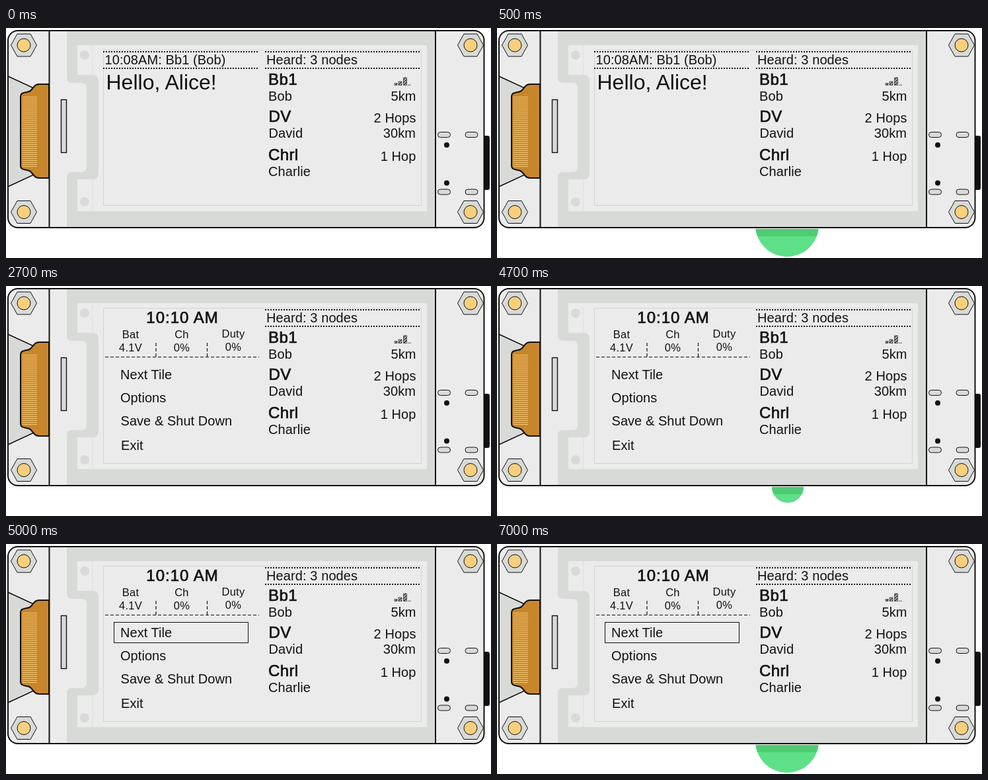
An HTML page for the animation above (8000 ms loop, 734 by 348 pixels).

```html
<!DOCTYPE html>
<html lang="en">
<head>
<meta charset="utf-8">
<title>E-ink device menu</title>
<style>
html, body { margin: 0; width: 100%; height: 100%; overflow: hidden; background: #fff; }
svg { display: block; width: 100%; height: 100%; }
text { font: 20px "Liberation Sans", Arial, sans-serif; letter-spacing: .1px; fill: #111; }
.big { font-size: 32px; letter-spacing: 0; }
.name, .clock { font-size: 24px; letter-spacing: .4px; stroke: #111; stroke-width: .7px; }
.clock { letter-spacing: 1px; }
.small { font-size: 16.5px; letter-spacing: .3px; }
.menu { letter-spacing: .05px; }
.end { text-anchor: end; }
.mid { text-anchor: middle; }
.line { fill: none; stroke: #111; }
.part { fill: #d8dad7; stroke: #111; }
</style>
</head>
<body>
<svg viewBox="0 0 734 348">
  <defs>
    <clipPath id="below"><rect y="304" width="734" height="44"/></clipPath>
    <clipPath id="shade"><rect y="304" width="734" height="11"/></clipPath>
    <pattern id="hatch" width="3" height="3" patternUnits="userSpaceOnUse" patternTransform="rotate(45)">
      <rect width="3" height="3" fill="#ebebeb"/><rect width="1.6" height="3" fill="#222"/>
    </pattern>
    <g id="nut">
      <path class="part" d="M-19.5 0L-10-17H10L19.5 0L10 17H-10Z"/>
      <circle r="10" fill="#f8cf7c" stroke="#111"/>
    </g>
    <rect id="pad" class="part" x="-9.5" y="-4" width="19" height="8" rx="4"/>
    <path id="rules" class="line" stroke-width="2" stroke-dasharray="2 2" d="M0 36H236M0 61H236"/>
  </defs>

  <!-- board -->
  <rect x="718" y="163" width="14" height="82" rx="3" fill="#111"/>
  <rect x="3" y="4" width="720.5" height="298" rx="15" fill="#ebebeb"/>
  <path fill="#d8dad7" d="M92 4H650V302H92V226Q92 218 100 218H115Q122 218 122 211V90Q122 83 115 83H100Q92 83 92 75Z"/>
  <path fill="#ebebeb" d="M108 26H637V277H108V229H131Q140 229 140 220V80Q140 71 131 71H108Z"/>
  <path d="M131 26V71M131 229V277" stroke="#dddfdc" fill="none"/>
  <g fill="#d8dad7"><circle cx="119" cy="41" r="7"/><circle cx="119" cy="263" r="7"/></g>
  <rect x="147.5" y="33.5" width="481" height="235" fill="none" stroke="#d3d5d2"/>

  <!-- ribbon cable -->
  <path class="part" d="M3 73L42 91V222L3 240Z" stroke-width="1.5"/>
  <path d="M65 85H50Q46 85 43 88L38 94Q35 97 31 97L27 98Q22 99 22 104V208Q22 213 27 214L31 215Q35 215 38 218L43 224Q46 227 50 227H65Z" fill="#c8862b" stroke="#111" stroke-width="2"/>
  <path id="pins" stroke="#f2c873" fill="none"/>
  <rect class="part" x="83.5" y="108.5" width="8" height="80" stroke-width="1.4"/>
  <path class="line" stroke-width="2" d="M65.5 4V302M650 4V302"/>
  <rect class="line" x="3" y="4" width="720.5" height="298" rx="15" stroke-width="2"/>

  <use href="#nut" x="27" y="26"/><use href="#nut" x="703" y="26"/>
  <use href="#nut" x="27" y="278.5"/><use href="#nut" x="703" y="278.5"/>
  <use href="#pad" x="663" y="161.5"/><use href="#pad" x="704.5" y="161.5"/>
  <use href="#pad" x="663" y="248"/><use href="#pad" x="704.5" y="248"/>
  <g fill="#111"><circle cx="667" cy="177" r="4"/><circle cx="667" cy="234.5" r="4"/></g>

  <!-- node list -->
  <use href="#rules" x="392"/>
  <text x="394" y="55">Heard: 3 nodes</text>
  <text class="name" x="397" y="86">Bb1</text>
  <text x="397" y="110">Bob</text>
  <text class="end" x="620.5" y="110">5km</text>
  <text class="name" x="397.5" y="142">DV</text>
  <text x="397.5" y="166">David</text>
  <text class="end" x="620.5" y="143">2 Hops</text>
  <text class="end" x="620" y="166">30km</text>
  <text class="name" x="397" y="200">Chrl</text>
  <text x="397" y="224">Charlie</text>
  <text class="end" x="620.5" y="201">1 Hop</text>
  <g fill="url(#hatch)" stroke="#333" stroke-width=".7">
    <path d="M588 83.5H592V86.5H588ZM594 81H599V86.5H594ZM601.5 75H606.5V86.5H601.5Z"/>
    <path d="M608 86.2H613"/>
  </g>

  <g id="message">
    <use href="#rules" x="147"/>
    <text x="149.5" y="55">10:08AM: Bb1 (Bob)</text>
    <text class="big" x="151.5" y="93">Hello, Alice!</text>
  </g>

  <g id="menu">
    <text class="clock mid" x="267" y="56">10:10 AM</text>
    <g class="mid">
      <text class="small" x="188.5" y="79">Bat</text>
      <text class="small" x="266" y="79">Ch</text>
      <text class="small" x="344" y="78">Duty</text>
      <text class="small" x="188.5" y="99">4.1V</text>
      <text class="small" x="266" y="99">0%</text>
      <text class="small" x="344" y="98">0%</text>
    </g>
    <path class="line" stroke-width="1.2" stroke-dasharray="5 3" d="M150 107.5H383M227 86V107M304.5 86V107"/>
    <text class="menu" x="173" y="141">Next Tile</text>
    <text class="menu" x="173" y="176">Options</text>
    <text class="menu" x="173.5" y="211">Save &amp; Shut Down</text>
    <text class="menu" x="174" y="248">Exit</text>
    <rect id="cursor" class="line" x="163.5" y="118.5" width="203" height="31"/>
  </g>

  <g id="press" clip-path="url(#below)">
    <circle id="touch" fill="#5de088"/>
    <circle id="shadow" fill="#4dcc71" clip-path="url(#shade)"/>
  </g>
</svg>
<script>
const LOOP = 8000;
const el = id => document.getElementById(id);
const show = (id, on) => el(id).setAttribute("display", on ? "inline" : "none");
const within = (t, a, b) => t >= a && t < b;

let pins = "";
for (let y = 104.5; y < 210; y += 3) pins += `M25 ${y}H47`;
el("pins").setAttribute("d", pins);

function setTouch(cx, cy, r) {
  for (const id of ["touch", "shadow"]) {
    for (const [key, value] of Object.entries({ cx, cy, r })) el(id).setAttribute(key, value);
  }
}

function draw(t) {
  const long = within(t, 500, 2700) || t >= 7000;
  const tap = within(t, 4700, 5000);
  show("message", t < 2500);
  show("menu", t >= 2500);
  show("cursor", t >= 4900);
  show("press", long || tap);
  if (tap) setTouch(440, 304, 24);
  else setTouch(439, 298, 48);
}

const start = performance.now();
function tick() {
  draw((performance.now() - start) % LOOP);
  requestAnimationFrame(tick);
}
tick();
</script>
</body>
</html>
```
